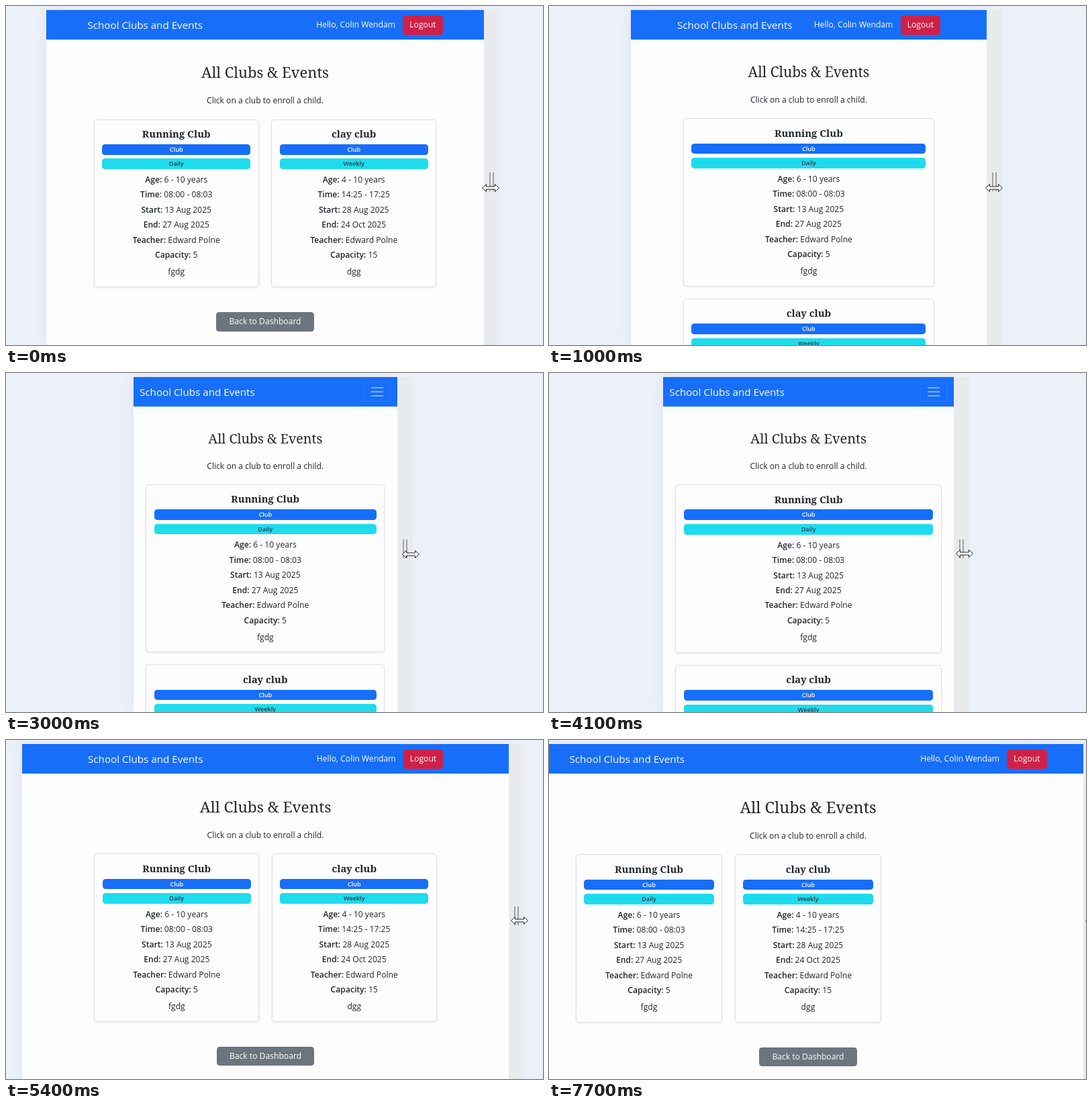
An HTML page for the animation above (7.8 s loop, 800 by 505 pixels).

```html
<!DOCTYPE html>
<html lang="en">
<head>
<meta charset="utf-8">
<title>School Clubs and Events</title>
<style>
html, body { margin: 0; width: 100%; height: 100%; overflow: hidden; }
body { color: #212529; font: 12.14px/18px "Open Sans", sans-serif; white-space: nowrap; }
div, span, svg { position: absolute; box-sizing: border-box; }
.stage { inset: 0; overflow: clip; background: #ecf0f9; }
.page { top: 6px; bottom: 0; background: #fefdfe; box-shadow: 0 0 18px rgba(40, 50, 90, .07); }
.nav { width: 100%; height: 44px; background: #176ef9; }
.strip { top: 6px; bottom: 0; width: 22.5px; background: #e9eaee; }
.strip::before { content: ""; position: absolute; left: 8px; top: 242px; width: 3px; height: 28px;
  border: solid #a3a3a3; border-width: 0 2px; }
.box { top: 0; height: 100%; }
.brand { left: 0; top: 15px; font-size: 15.18px; line-height: 26px; color: #fff; }
.hello { right: 70.5px; top: 18.7px; color: #fff; }
.btn { height: 28.8px; line-height: 28.4px; border-radius: 4.5px; color: #fff; text-align: center; }
.logout { right: 0; top: 13.8px; width: 59.1px; background: #cf2148; }
.toggler { right: 0; top: 14px; width: 42px; height: 29px; border: 1px solid rgba(255, 255, 255, .08); border-radius: 4.5px; }
.toggler path { stroke: rgba(255, 255, 255, .6); stroke-width: 1.5; }
.main { top: 85.5px; width: 100%; text-align: center; }
h2 { margin: 0; font: 400 20px/1.2 "Noto Serif", serif; }
p { margin: 20.5px 0 18.2px; }
.main section { display: flex; flex-wrap: wrap; }
.card { position: relative; height: 250.5px; margin: 0 9.1px 18px; border: 1px solid #dcdfe9; border-radius: 5px;
  background: #fefdfe; box-shadow: 0 1px 3px rgba(30, 40, 70, .09); }
.card > * { left: 11.5px; right: 11.5px; height: 18px; }
.card strong { font-weight: 600; }
.card .title { top: 11.5px; font: 700 14.8px/18px "Noto Serif", serif; }
.card .badge { height: 15.7px; border-radius: 4.6px; font: 600 9.1px/15.4px "Open Sans", sans-serif; }
.back { position: relative; display: inline-block; margin-top: 18.7px; width: 145.9px; background: #6c757d; }
</style>
</head>
<body>
<div class="stage">
  <div class="page" id="page"><div class="nav"></div></div>
  <div class="strip" id="strip"></div>
  <div class="box" id="box">
    <span class="brand">School Clubs and Events</span>
    <div id="wide" style="right:0;top:0">
      <span class="hello">Hello, Colin Wendam</span>
      <div class="btn logout">Logout</div>
    </div>
    <div class="toggler" id="toggler"><svg width="40" height="27"><path d="M11 7h18M11 13h18M11 19h18"/></svg></div>
    <div class="main">
      <h2 id="heading">All Clubs &amp; Events</h2>
      <p>Click on a club to enroll a child.</p>
      <section id="cards"></section>
      <div class="btn back">Back to Dashboard</div>
    </div>
  </div>
  <svg id="cursor" width="28" height="14" viewBox="-14 -7 28 14">
    <path d="M-12.5 0L-6.5-5.5V-2H6.5V-5.5L12.5 0L6.5 5.5V2H-6.5V5.5Z" fill="#fff" stroke="#222"/>
  </svg>
</div>
<script>
const $ = id => document.getElementById(id);
const LOOP = 7800, STEP = 100;

function card(title, often, age, time, start, end, capacity, note) {
  const rows = Object.entries({ Age: age + ' years', Time: time, Start: start, End: end,
    Teacher: 'Edward Polne', Capacity: capacity });
  const badge = (top, bg, color, text) =>
    `<div class="badge" style="top:${top}px;background:${bg};color:${color}">${text}</div>`;
  return `<div class="card"><div class="title">${title}</div>` +
    badge(36.3, '#176ef9', '#fff', 'Club') + badge(57.9, '#1edced', '#2b3a4c', often) +
    rows.map(([k, v], i) => `<div style="top:${80.5 + 22.45 * i}px"><strong>${k}:</strong> ${v}</div>`).join('') +
    `<div style="top:217.8px">${note}</div></div>`;
}
$('cards').innerHTML =
  card('Running Club', 'Daily', '6 - 10', '08:00 - 08:03', '13 Aug 2025', '27 Aug 2025', 5, 'fgdg') +
  card('clay club', 'Weekly', '4 - 10', '14:25 - 17:25', '28 Aug 2025', '24 Oct 2025', 15, 'dgg');

// time, page left, page right, content centre, pointer offset from the right edge
const keys = [
  [0, 60, 711.5, 386, 10.5],
  [800, 116, 657, 386.5, 11],
  [1000, 122, 652, 386.9, 11],
  [1600, 143.5, 629, 386.5, 11],
  [2000, 166, 606, 386.2, 11.5],
  [2400, 190, 583, 386.3, 20],
  [3200, 190, 583, 386.3, 20],
  [4000, 176, 597, 386.5, 16],
  [4100, 170, 603, 386.6, 15.5],
  [4800, 79.4, 692, 387, 16],
  [5600, 5, 768, 386.4, 16],
  [6100, -24, 795.6, 386, 16],
  [LOOP, -24, 795.6, 386, 16]
];

function pose(t) {
  const i = keys.findIndex(k => k[0] > t), a = keys[i - 1], b = keys[i];
  const u = (t - a[0]) / (b[0] - a[0]);
  return a.map((v, j) => v + (b[j] - v) * u);
}

function draw(now) {
  const t = Math.floor(now % LOOP / STEP) * STEP;
  const [, left, right, centre, offset] = pose(t);
  const width = right - left;
  // responsive breakpoints: container width and number of columns
  const [w, cols] = width >= 750 ? [711, 3] : width >= 582 ? [529, 2] :
    width >= 436 ? [392, 1] : [width - 18.5, 1];
  const narrow = width < 436;
  const place = (id, x, span) => {
    $(id).style.left = x + 'px';
    if (span) $(id).style.width = span + 'px';
  };

  place('page', left, width);
  place('strip', right);
  place('box', centre - w / 2, w);
  place('cursor', right + offset - 14);
  $('cursor').style.top = 264 - Math.min(t, 4000) / 2000 + 'px';
  $('wide').style.display = narrow ? 'none' : 'block';
  $('toggler').style.display = narrow ? 'block' : 'none';
  $('heading').style.fontSize = 16.1 + .009 * width + 'px';
  for (const c of $('cards').children) c.style.width = w / cols - 18.2 + 'px';
}

const begin = performance.now();
function tick() {
  draw(performance.now() - begin);
  requestAnimationFrame(tick);
}
tick();
</script>
</body>
</html>
```
